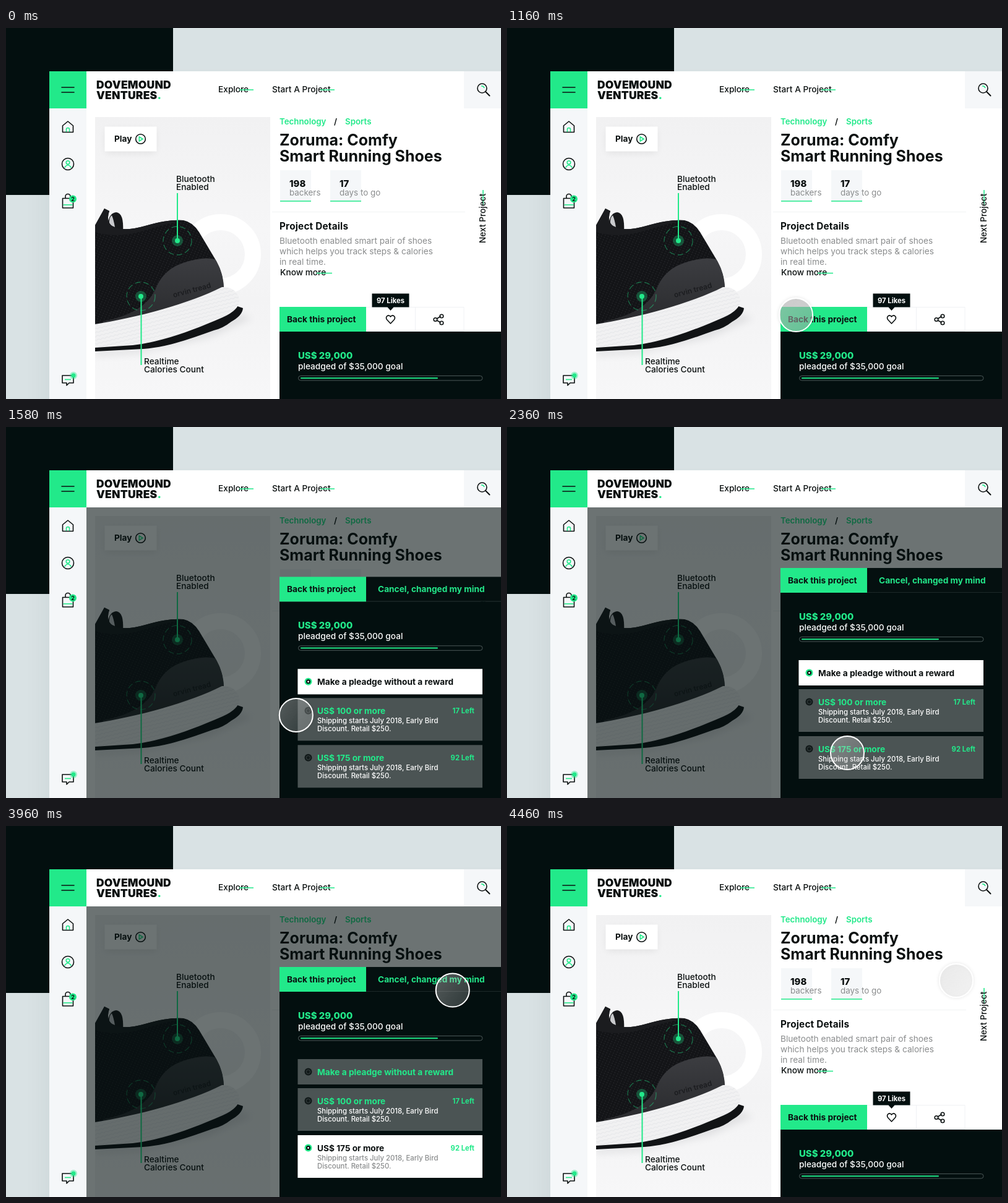
An HTML page for the animation above (5.38 s loop, 800 px wide and 600 px high).

```html
<!DOCTYPE html>
<html lang="en">
<head>
<meta charset="utf-8">
<title>Project page</title>
<style>
  :root { --green: #22e98a; --ink: #030f0f; --pale: #f5f7f9; }
  html, body { margin: 0; width: 100%; height: 100%; overflow: hidden; background: #d9e2e4; }
  svg { display: block; width: 100%; height: 100%; }
  text { font-family: Inter, "Open Sans", sans-serif; font-size: 13.7px; font-weight: 400; fill: #0b1010; }
  .nav { font-weight: 500; }
  .logo { font-size: 17.5px; font-weight: 900; letter-spacing: .2px; }
  .title { font-size: 25px; font-weight: 700; }
  .tag { font-size: 13.3px; font-weight: 600; }
  .num { font-size: 14.9px; font-weight: 800; }
  .head { font-size: 15.3px; font-weight: 700; letter-spacing: .2px; }
  .bold { font-size: 13.7px; font-weight: 700; }
  .small { font-size: 11.3px; font-weight: 700; }
  .note { font-size: 11.4px; font-weight: 500; }
  .grey { fill: #8a8c8d; }
  .white { fill: #fff; }
  .green { fill: var(--green); }
  .ink { fill: var(--ink); }
  .pale { fill: var(--pale); }
  .line { fill: none; stroke: #0b1010; stroke-width: 1.6; stroke-linecap: round; stroke-linejoin: round; }
  .gline { fill: none; stroke: var(--green); stroke-width: 1.6; }
  .thick { stroke-width: 2; }
  .rule { fill: none; stroke: #f0f2f4; }
</style>
</head>
<body>
<svg viewBox="0 0 800 600" preserveAspectRatio="none">
  <defs>
    <filter id="soft" x="-20%" y="-20%" width="140%" height="140%"><feGaussianBlur stdDeviation="16"/></filter>
    <filter id="blur" x="-30%" y="-50%" width="160%" height="200%"><feGaussianBlur stdDeviation="6"/></filter>
    <filter id="glow" x="-30%" y="-30%" width="160%" height="160%">
      <feDropShadow dx="0" dy="0" stdDeviation="2.5" flood-color="#000" flood-opacity=".14"/>
    </filter>
    <pattern id="knit" width="5" height="4" patternUnits="userSpaceOnUse" patternTransform="rotate(24)">
      <rect width="5" height="4" fill="#131417"/>
      <circle cx="1.5" cy="1.5" r=".8" fill="#2c2d31"/>
    </pattern>
    <pattern id="foam" width="7" height="6" patternUnits="userSpaceOnUse" patternTransform="rotate(-14)">
      <rect width="7" height="6" fill="#f1f1f2"/>
      <path d="M0 3Q2 1 4 3T7 3" fill="none" stroke="#e0e1e3" stroke-width=".8"/>
    </pattern>
    <linearGradient id="wall" x1="0" y1="0" x2="0" y2="1">
      <stop offset="0" stop-color="#f1f1f2"/><stop offset=".4" stop-color="#f6f6f7"/>
      <stop offset=".65" stop-color="#f3f3f4"/><stop offset="1" stop-color="#f7f7f8"/>
    </linearGradient>
    <linearGradient id="shell" x1="0" y1="0" x2="0" y2="1">
      <stop offset="0" stop-color="#3c3d41"/><stop offset="1" stop-color="#28292c"/>
    </linearGradient>
    <linearGradient id="lens" x1="0" y1="0" x2="1" y2=".7">
      <stop offset="0" stop-color="#d0d0d0" stop-opacity=".38"/>
      <stop offset="1" stop-color="#d0d0d0" stop-opacity=".22"/>
    </linearGradient>
    <clipPath id="photo"><rect x="144" y="144" width="283" height="456"/></clipPath>
  </defs>

  <rect width="800" height="600" fill="#d9e2e4"/>
  <rect x="60" y="90" width="780" height="560" fill="#31464a" opacity=".06" filter="url(#soft)"/>
  <rect class="ink" width="270" height="270"/>
  <rect class="white" x="70" y="70" width="730" height="530"/>

  <!-- header -->
  <rect class="green" x="70" y="70" width="60" height="60"/>
  <path class="line" d="M90 96H110M90 104H110"/>
  <text class="logo" x="146" y="98">DOVEMOUND</text>
  <text class="logo" x="146" y="115">VENTURES<tspan class="green">.</tspan></text>
  <text class="nav" x="343" y="104">Explore</text>
  <text class="nav" x="430" y="104">Start A Project</text>
  <path class="gline" d="M377 100H400M508 100H531"/>
  <rect class="pale" x="740" y="70" width="60" height="60"/>
  <circle class="line" cx="769.5" cy="97.5" r="7.5"/>
  <path class="line thick" d="M775 103L781.5 109.5"/>
  <path class="gline" d="M768 93.8Q772 93.5 773 97"/>

  <!-- sidebar -->
  <rect class="pale" x="70" y="130" width="60" height="470"/>
  <path class="line" d="M91.5 158L100 151L108.5 158V168.5H91.5Z"/>
  <path class="gline" d="M97.5 168V164A2.5 2.5 0 0 1 102.5 164V168"/>
  <circle class="line" cx="100" cy="220" r="9.5"/>
  <circle class="gline" cx="100" cy="217.5" r="2.8"/>
  <path class="gline" d="M94.5 226Q100 217.5 105.5 226"/>
  <path class="line" d="M91.5 275.5H108.5V291H91.5ZM96 275V272.5A4 4 0 0 1 104 272.5V275"/>
  <path class="gline" d="M92.5 286H107.5"/>
  <circle class="green" cx="108" cy="276.5" r="6"/>
  <text x="108" y="280" text-anchor="middle" style="font-size:9px;font-weight:700">2</text>
  <path class="line" d="M91 562H109V574H102L98 578V574H91Z"/>
  <path class="gline" d="M95 568.5H105"/>
  <circle class="green" cx="109" cy="562" r="6" opacity=".4"/>
  <circle class="green" cx="109" cy="562" r="3.5"/>

  <!-- product picture -->
  <g clip-path="url(#photo)">
    <rect x="144" y="144" width="283" height="456" fill="url(#wall)"/>
    <circle cx="347" cy="366" r="52" fill="none" stroke="#fff" stroke-width="26"/>
    <path d="M144 522L240 516L380 462L396 470L330 500L220 526L144 530Z" fill="#85878c" opacity=".18" filter="url(#blur)"/>
    <path d="M165 322Q164 300 178 298Q191 299 189 330L170 334Z" fill="#17181a"/>
    <path d="M167 318Q166 306 171 303Q174 310 176 322Z" fill="#c9cacd"/>
    <path d="M144 319L159 292L167 296Q161 312 172 321Q190 330 225 320Q262 309 287 311Q302 314 312 330L340 377Q352 398 352 426L300 462L144 490Z" fill="url(#knit)"/>
    <path d="M144 319L159 292L167 296Q161 312 172 321Q190 330 225 320Q262 309 287 311Q250 319 222 328Q180 341 144 330Z" fill="#1b1c1f"/>
    <path d="M158 474Q222 462 241 424Q253 391 286 380Q318 369 338 374Q353 398 352 426L250 462L150 486Z" fill="url(#shell)"/>
    <text transform="translate(271 436) rotate(-15)" style="font-size:12px;font-weight:600;fill:#1c1d20">orvin tread</text>
    <path d="M144 512L230 506L340 470L374 450L383 453Q382 465 364 475Q350 486 336 489C300 502 262 516 222 519L144 523Z" fill="#111315"/>
    <path d="M144 479C200 470 290 449 349 419Q371 418 377 438Q379 455 350 468C300 490 250 508 205 513L144 517Z" fill="url(#foam)"/>
  </g>
  <rect x="161" y="164" width="81" height="38" opacity=".07" filter="url(#blur)"/>
  <rect class="white" x="159.5" y="159.5" width="84" height="40"/>
  <text class="bold" x="175" y="184">Play</text>
  <circle class="line" cx="217.5" cy="179.5" r="7.8"/>
  <path class="gline" d="M215.3 176L221 179.5L215.3 183Z"/>
  <text class="nav" x="275" y="249">Bluetooth</text>
  <text class="nav" x="275" y="262">Enabled</text>
  <text class="nav" x="223" y="544">Realtime</text>
  <text class="nav" x="223" y="557">Calories Count</text>
  <path class="gline thick" d="M277 267V344M218.5 434V545"/>
  <g id="spots"></g>

  <!-- project text -->
  <text class="tag green" x="442" y="155.5">Technology</text>
  <text class="tag" x="530" y="155.5">/</text>
  <text class="tag green" x="548" y="155.5">Sports</text>
  <text class="title" x="442" y="190">Zoruma: Comfy</text>
  <text class="title" x="442" y="216">Smart Running Shoes</text>
  <path class="pale" d="M443 230H493V280H443ZM524 230H574V280H524Z"/>
  <path class="gline" d="M443 280H493M524 280H574"/>
  <text class="num" x="458" y="256.5">198</text>
  <text class="grey" x="458" y="270.5" style="font-size:13.4px">backers</text>
  <text class="num" x="539" y="256.5">17</text>
  <text class="grey" x="539" y="270.5" style="font-size:13.4px">days to go</text>
  <path class="rule" d="M430 297.5H742"/>
  <text class="head" x="442" y="325.5">Project Details</text>
  <text class="grey" x="442" y="349">Bluetooth enabled smart pair of shoes</text>
  <text class="grey" x="442" y="366">which helps you track steps &amp; calories</text>
  <text class="grey" x="442" y="382.5">in real time.</text>
  <text class="nav" x="443" y="399.5">Know more</text>
  <path class="gline" d="M502 396.5H527M771 262V287"/>
  <text class="nav" transform="translate(774.5 348) rotate(-90)">Next Project</text>

  <rect id="shade" class="ink" x="130" y="130" width="670" height="470" opacity="0"/>

  <!-- sliding panel, placed as when closed -->
  <g id="panel">
    <g id="tools">
      <path class="rule" d="M582 451.5H740V490.5H582M661.5 451V490"/>
      <path class="ink" d="M591.5 429.5H651.5V451.5H626.5L621.5 457L616.5 451.5H591.5Z"/>
      <text class="small white" x="621.5" y="444.5" text-anchor="middle">97 Likes</text>
      <path class="line" d="M621.5 478L615.5 471.5C612.5 467 618.5 462 621.5 467C624.5 462 630.5 467 627.5 471.5Z"/>
      <g class="line">
        <path d="M696.5 470L702 466.5M696.5 473L702 476"/>
        <circle cx="694" cy="471.5" r="2.8"/><circle cx="704" cy="466" r="2.8"/><circle cx="704" cy="477" r="2.8"/>
      </g>
    </g>
    <g id="cancel" opacity="0">
      <rect class="ink" x="582" y="451" width="218" height="40"/>
      <path d="M582 490.5H800" stroke="#1c2828"/>
      <text class="bold green" x="601" y="475.5">Cancel, changed my mind</text>
    </g>
    <rect class="ink" x="442" y="491" width="358" height="400"/>
    <rect class="green" x="442" y="451" width="140" height="40"/>
    <text class="bold" x="454" y="475.5">Back this project</text>
    <text class="num green" x="472" y="534.5">US$ 29,000</text>
    <text class="nav white" x="472" y="552">pleadged of $35,000 goal</text>
    <rect x="472.5" y="562.5" width="297.5" height="7.5" rx="3.75" fill="none" stroke="#4b5757"/>
    <path class="gline thick" d="M477 566.2H697" stroke-linecap="round"/>
    <g id="cards"></g>
  </g>

  <g id="cursor" opacity="0" filter="url(#glow)">
    <circle id="press" r="26" fill="#888" fill-opacity=".36" opacity="0"/>
    <circle r="27" fill="url(#lens)" stroke="#fff" stroke-width="2"/>
  </g>
</svg>
<script>
const LOOP = 5380, RISE = 223;
const $ = id => document.getElementById(id);

$('spots').innerHTML = [[277, 344], [218, 434]].map(([x, y]) => `
  <circle cx="${x}" cy="${y}" r="23" fill="none" stroke="#22e98a" stroke-opacity=".42" stroke-width="1.3" stroke-dasharray="9 5"/>
  <circle class="green" cx="${x}" cy="${y}" r="9" opacity=".3"/>
  <circle class="green" cx="${x}" cy="${y}" r="4"/>`).join('');

const radio = (y, on) => on
  ? `<circle class="green" cx="488.5" cy="${y}" r="6"/><circle class="ink" cx="488.5" cy="${y}" r="3.5"/><circle class="white" cx="488.5" cy="${y}" r="1.5"/>`
  : `<circle cx="488.5" cy="${y}" r="6" fill="#111919"/><circle cx="488.5" cy="${y}" r="3.2" fill="none" stroke="#394242"/>`;

function face(y, h, label, left, on) {
  const mid = y + 20.5;
  let s = `<rect x="471.5" y="${y}" width="298.5" height="${h}" fill="${on ? '#fff' : '#4b5454'}"/>`
    + radio(mid, on) + `<text class="bold ${on ? '' : 'green'}" x="503" y="${mid + 5}">${label}</text>`;
  if (left) {
    const tone = on ? 'grey' : 'white';
    s += `<text class="small green" x="757" y="${mid + 4}" text-anchor="end">${left} Left</text>
      <text class="note ${tone}" x="503" y="${mid + 20}">Shipping starts July 2018, Early Bird</text>
      <text class="note ${tone}" x="503" y="${mid + 33}">Discount. Retail $250.</text>`;
  }
  return s;
}

$('cards').innerHTML = [
  [600, 41, 'Make a pleadge without a reward', 0],
  [647, 69, 'US$ 100 or more', 17],
  [723, 69, 'US$ 175 or more', 92]
].map((c, i) => `<g>${face(...c, false)}</g><g id="on${i}" opacity="0">${face(...c, true)}</g>`).join('');

// Ease in and out with power p, from time a to time b
function ease(t, a, b, p) {
  const u = Math.min(1, Math.max(0, (t - a) / (b - a)));
  return u < .5 ? .5 * (2 * u) ** p : 1 - .5 * (2 - 2 * u) ** p;
}

// start, end, power, then start point, control point, end point
const moves = [
  [40, 1040, 6, [62, 515], [333, 385], [467, 464]],
  [1380, 2240, 4, [467, 464], [505, 505], [550, 527]],
  [3280, 4350, 9, [550, 527], [652, 527], [726, 250]]
];
// down from, down to, up from, up to
const presses = [[1080, 1150, 1200, 1340], [2370, 2480, 3290, 3440], [3980, 4060, 4110, 4270]];

function place(t) {
  const [a, b, p, from, ctrl, to] = moves.filter(m => t >= m[0]).pop() || moves[0];
  const s = ease(t, a, b, p), r = 1 - s;
  return from.map((v, i) => r * r * v + 2 * r * s * ctrl[i] + s * s * to[i]);
}

const fade = (id, v) => $(id).setAttribute('opacity', v.toFixed(3));
const shift = (id, x, y) => $(id).setAttribute('transform', `translate(${x.toFixed(2)} ${y.toFixed(2)})`);

function draw(t) {
  const open = ease(t, 1180, 1780, 5) - ease(t, 3980, 4460, 4);
  const dim = ease(t, 1170, 1580, 2) - ease(t, 3980, 4450, 2);
  const pick = ease(t, 2370, 2600, 2);
  shift('panel', 0, -RISE * open);
  fade('shade', .58 * dim);
  fade('tools', Math.max(0, 1 - 2 * dim));
  fade('cancel', .98 * dim);
  fade('on0', 1 - pick);
  fade('on2', pick);
  shift('cursor', ...place(t));
  fade('cursor', ease(t, 40, 180, 1));
  fade('press', presses.reduce((v, [a, b, c, d]) => v + ease(t, a, b, 2) - ease(t, c, d, 2), 0));
}

const start = performance.now();
function tick() {
  draw((performance.now() - start) % LOOP);
  requestAnimationFrame(tick);
}
draw(0);
requestAnimationFrame(tick);
</script>
</body>
</html>
```
